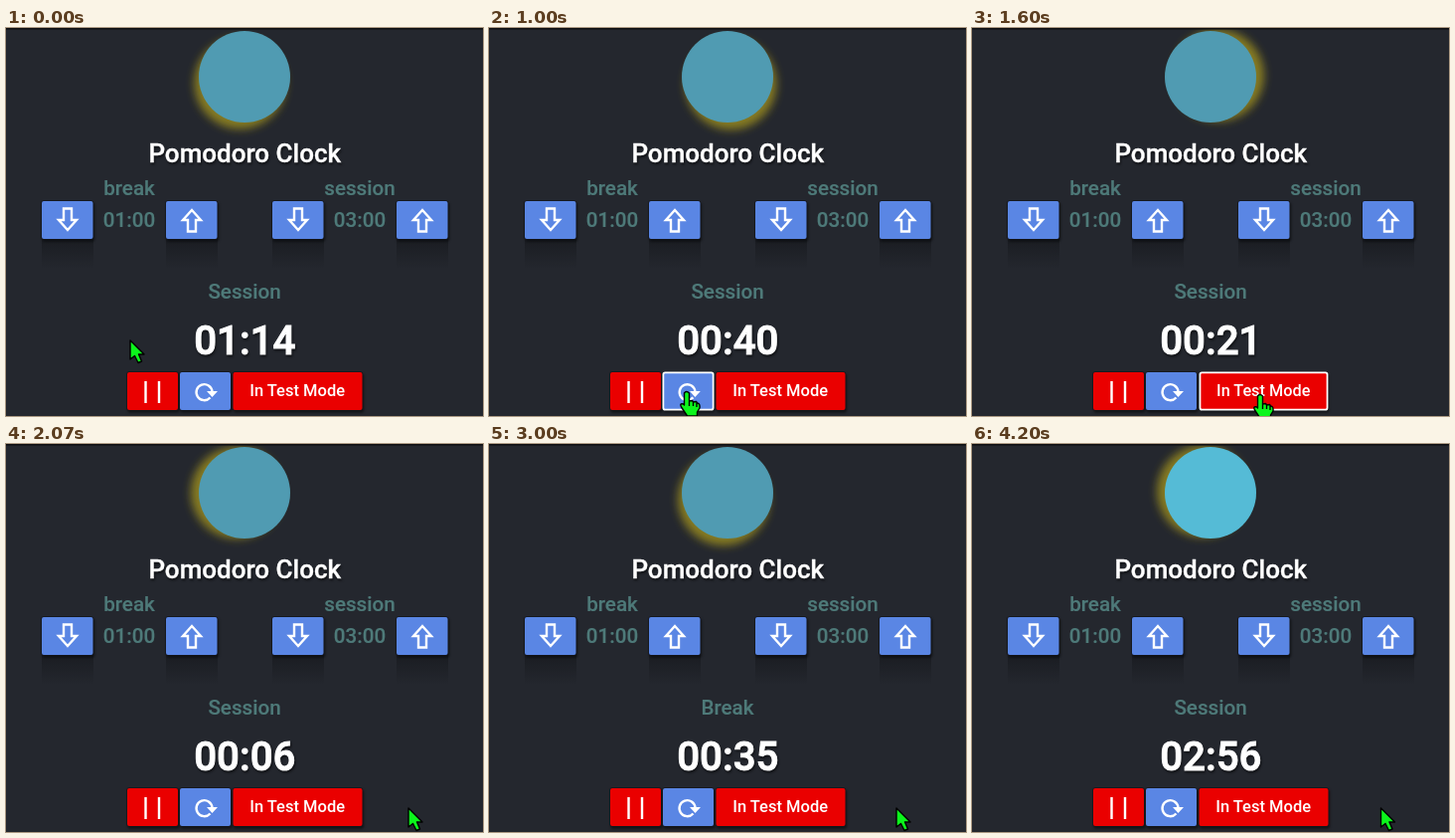
Recreate the animation shown at these times as an HTML page. Size 480x390 px, loop 4.27 s.

```html
<!DOCTYPE html>
<html lang="en">
<head>
<meta charset="utf-8">
<title>Pomodoro Clock</title>
<style>
html, body { margin: 0; width: 100%; height: 100%; overflow: hidden; background: #24272e; }
svg { display: block; width: 480px; height: 390px; }
text { font-family: Roboto, Arial, sans-serif; font-weight: 500; text-anchor: middle; }
.label { font-size: 20.6px; fill: #4e7a79; stroke: #4e7a79; stroke-width: .2; }
.white { fill: #fff; }
.title { font-size: 26px; stroke: #fff; stroke-width: .4; }
.clock { font-size: 40.3px; stroke: #fff; stroke-width: 1; }
.shade { filter: drop-shadow(1px 2px 1px rgba(0, 0, 0, .5)); }
.blue { fill: #5a86e4; }
.red { fill: #ea0000; }
.box { stroke: #15171c; stroke-width: 1.4; paint-order: stroke; }
.button { transform-box: fill-box; transform-origin: center; }
.hover { transform: scale(.985); }
.hover .box { stroke: #fff; stroke-width: 1.8; paint-order: normal; }
.line { fill: none; stroke: #fff; stroke-width: 2.4; }
.pointer { fill: #0cf51c; stroke: #000; stroke-width: 1.4; stroke-linejoin: round; }
</style>
</head>
<body>
<svg viewBox="0 0 480 390">
  <defs>
    <linearGradient id="fade" x2="0" y2="1">
      <stop offset="0" stop-color="#101216" stop-opacity=".5"/>
      <stop offset="1" stop-color="#101216" stop-opacity="0"/>
    </linearGradient>
    <filter id="blur" x="-30%" y="-30%" width="160%" height="160%">
      <feGaussianBlur stdDeviation="4"/>
    </filter>
  </defs>
  <rect width="480" height="390" fill="#24272e"/>
  <circle id="glow" r="46" fill="#857a22" filter="url(#blur)"/>
  <circle id="badge" cx="240" cy="49" r="46"/>
  <rect width="480" height="1.5" fill="#0d0e11"/>

  <text class="white title shade" x="240.3" y="135">Pomodoro Clock</text>
  <text class="label" x="124" y="168">break</text>
  <text class="label" x="356" y="168">session</text>
  <text class="label" x="124" y="200">01:00</text>
  <text class="label" x="356" y="200">03:00</text>
  <g id="steppers"></g>

  <text class="label" id="mode" x="240" y="272"></text>
  <text class="white clock shade" id="clock" x="240.3" y="328"></text>

  <g class="button" id="pause">
    <rect class="box red shade" x="122" y="346" width="51" height="38" rx="2"/>
    <path class="line" d="M140.5 355v22M154 355v22"/>
  </g>
  <g class="button" id="reset">
    <rect class="box blue shade" x="175" y="346" width="51" height="38" rx="2"/>
    <path class="line" d="M205.5 371.5A8 8 0 1 1 207.5 365.5"/>
    <path class="white" d="M202 365h11l-5.5 6z"/>
  </g>
  <g class="button" id="test">
    <rect class="box red shade" x="228.5" y="346" width="130" height="38" rx="2"/>
    <text class="white" x="293.2" y="370.3" font-size="16.5">In Test Mode</text>
  </g>

  <g id="cursor">
    <path class="pointer" id="arrow" d="M0 0V19L4.5 15.5L8 22.5L11.5 21L8.5 14H14Z"/>
    <path class="pointer" id="hand" transform="translate(1.5 0)" d="M-2 1Q0 -2 3 1V9L6 8.5L7 10L10 9.5L11 11Q14 11 13.5 16L11 20V24H1L-5 15Q-7 11 -3 12L-2 13ZM3 9V14M7 10V14M10.5 11V15"/>
  </g>
</svg>
<script>
const LOOP = 4270, STEP = 200 / 3;
const $ = id => document.getElementById(id);

// Each row: tick, then values
const COUNT = [[0, 0], [15, 34], [24, 53], [38, 84], [45, 100], [54, 120], [63, 140]];
const SPIN = [[0, 125], [15, 425], [24, 710], [38, 1090], [45, 1200], [54, 1440], [63, 1630]];
const PATH = [
  [0, 125, 314], [4, 132, 342], [7, 147, 364], [9, 150, 366], [13, 195, 366],
  [15, 197, 366], [18, 199, 367], [22, 282, 369], [24, 288, 369], [27, 300, 369],
  [31, 405, 366], [38, 410, 366], [45, 410, 366], [54, 411, 366], [63, 411.5, 366]
];
const BUTTONS = [["pause", 122, 173], ["reset", 175, 226], ["test", 228, 359]];

function sample(rows, tick) {
  const i = Math.max(1, rows.findIndex(r => r[0] >= tick));
  const a = rows[i - 1], b = rows[i];
  const p = (tick - a[0]) / (b[0] - a[0]);
  return a.slice(1).map((v, j) => v + (b[j + 1] - v) * p);
}

function stepper(x, up) {
  const flip = up ? `rotate(180 ${x + 26} 193)` : "";
  return `<rect x="${x}" y="212" width="52" height="30" fill="url(#fade)"/>
    <rect class="box blue shade" x="${x}" y="174" width="51.5" height="38" rx="2"/>
    <path class="line" transform="${flip}" d="M${x + 22} 181.5h8v11.5h5l-9 10l-9 -10h5z"/>`;
}
$("steppers").innerHTML =
  stepper(36) + stepper(161, true) + stepper(268) + stepper(393, true);

// 74 s of session, a 60 s break, then a fresh 180 s session
function timer(n) {
  if (n <= 74) return ["Session", 74 - n];
  if (n <= 135) return ["Break", 135 - n];
  return ["Session", 316 - n];
}

const pad = n => String(n).padStart(2, "0");

function draw(time) {
  const tick = Math.min(63, Math.floor((time % LOOP + 4) / STEP));
  const count = Math.floor(sample(COUNT, tick)[0] + 1e-6);
  const [mode, left] = timer(count);
  $("mode").textContent = mode;
  $("clock").textContent = pad(Math.floor(left / 60)) + ":" + pad(left % 60);

  const angle = sample(SPIN, tick)[0] * Math.PI / 180;
  $("glow").setAttribute("cx", 240 + 8 * Math.cos(angle));
  $("glow").setAttribute("cy", 49 + 8 * Math.sin(angle));
  $("badge").setAttribute("fill", count > 135 ? "#55bbd6" : "#509bb2");

  const [x, y] = sample(PATH, tick);
  let over = false;
  for (const [id, from, to] of BUTTONS) {
    const hit = y >= 346 && y <= 384 && x >= from && x <= to;
    $(id).classList.toggle("hover", hit);
    over = over || hit;
  }
  $("cursor").setAttribute("transform", `translate(${x} ${y})`);
  $("hand").style.display = over ? "" : "none";
  $("arrow").style.display = over ? "none" : "";
}

const start = performance.now();
function loop() {
  draw(performance.now() - start);
  requestAnimationFrame(loop);
}
loop();
</script>
</body>
</html>
```
